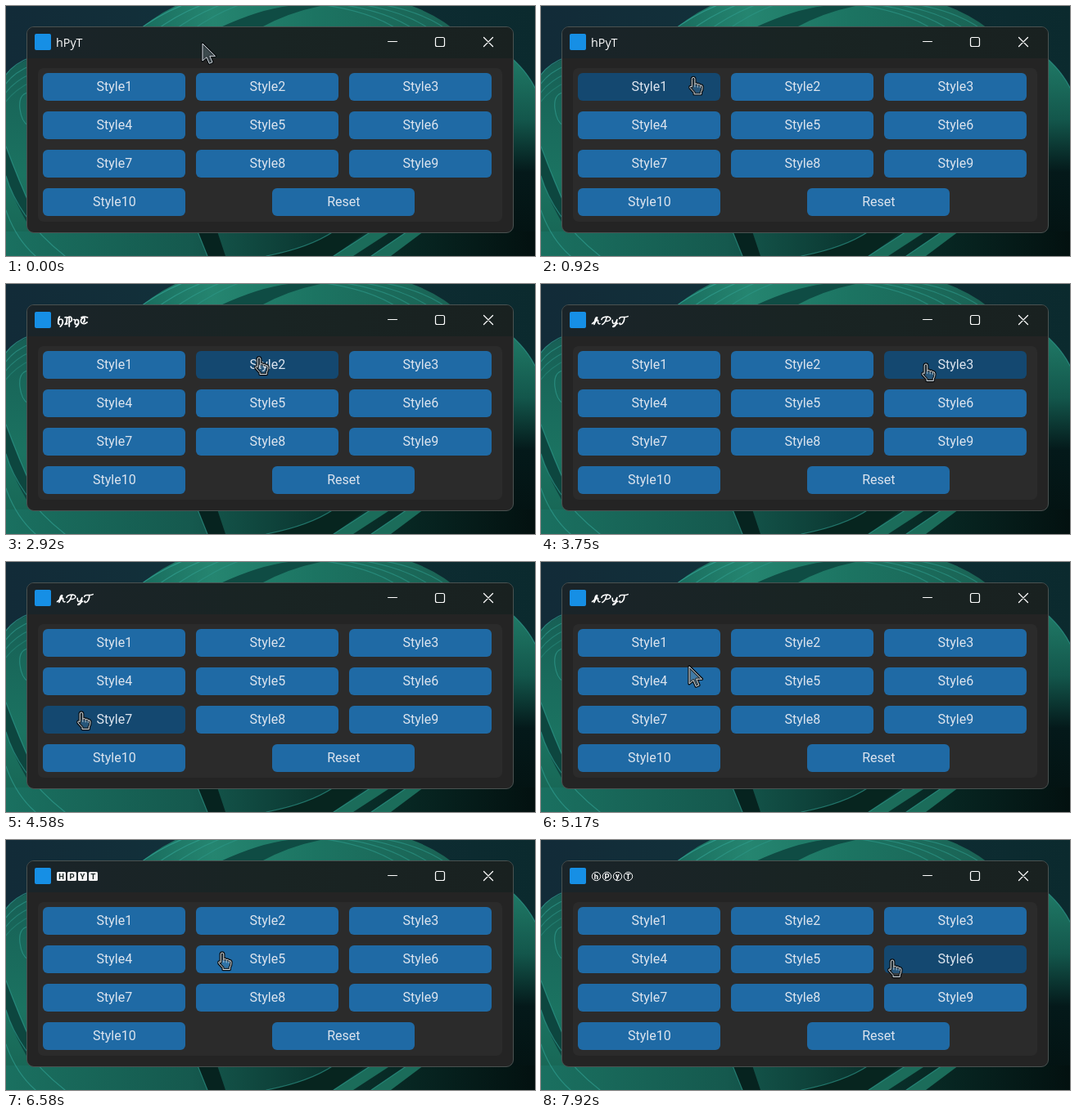
Animation of 646x306 px, one loop 8000 ms. Source, as an HTML page:

```html
<!DOCTYPE html>
<html lang="en">
<head>
<meta charset="utf-8">
<title>hPyT</title>
<style>
  html, body { margin: 0; width: 100%; height: 100%; overflow: hidden; background: #0b2527; }
  svg { display: block; width: 646px; height: 306px; }
  .label { font: 16px Roboto, sans-serif; fill: #dce4ee; text-anchor: middle; }
  .plain { font: 14.3px "Open Sans", sans-serif; fill: #fff; }
  .tile { font: 700 9.5px Roboto, sans-serif; text-anchor: middle; }
  .line { fill: none; stroke-linecap: round; stroke-linejoin: round; }
</style>
</head>
<body>
<svg viewBox="0 0 646 306">
  <defs>
    <linearGradient id="sky"><stop stop-color="#122b38"/><stop offset=".3" stop-color="#12303a"/><stop offset="1" stop-color="#0b2a2e"/></linearGradient>
    <linearGradient id="crown"><stop stop-color="#17695b"/><stop offset=".25" stop-color="#258570"/><stop offset=".55" stop-color="#1c7462"/><stop offset="1" stop-color="#1a6153"/></linearGradient>
    <linearGradient id="side" x2="0" y2="1"><stop stop-color="#175f55"/><stop offset=".6" stop-color="#1b7361"/><stop offset="1" stop-color="#176352"/></linearGradient>
    <linearGradient id="edge" x2="0" y2="1"><stop stop-color="#22806b"/><stop offset=".35" stop-color="#13564b"/><stop offset=".6" stop-color="#04191a"/><stop offset="1" stop-color="#031110"/></linearGradient>
    <linearGradient id="base"><stop stop-color="#1a7060"/><stop offset=".35" stop-color="#15594e"/><stop offset=".6" stop-color="#0a352f"/><stop offset="1" stop-color="#031110"/></linearGradient>
    <linearGradient id="bar"><stop stop-color="#1a2429"/><stop offset=".5" stop-color="#192423"/><stop offset="1" stop-color="#192120"/></linearGradient>
    <clipPath id="pane"><rect x="26" y="26" width="593" height="251" rx="8"/></clipPath>
  </defs>

  <g id="wallpaper">
    <rect width="646" height="306" fill="url(#sky)"/>
    <path d="M150 40Q192 0 240-12H450Q520 0 560 40Z" fill="url(#crown)"/>
    <path d="M262 26Q310 4 345 0H384Q345 8 312 26Z" fill="#0f4c44"/>
    <path d="M600 50Q632 72 646 100V306H600Z" fill="url(#edge)"/>
    <path d="M0 84Q10 70 40 60V306H0Z" fill="url(#side)"/>
    <path d="M0 276H646V306H0Z" fill="url(#base)"/>
    <path d="M0 172Q16 215 32 250V276Q10 240 0 208Z" fill="#0d463f"/>
    <path d="M234 276H258L268 306H246Z" fill="#06231f"/>
    <path d="M318 306Q370 296 400 276H440L400 306Z" fill="#07251f"/>
    <path d="M400 306L446 276H470L424 306ZM446 306L490 276H510L470 306Z" fill="#1b6c5a"/>
  </g>

  <rect x="25.5" y="25.5" width="594" height="252" rx="8.5" fill="#242424" stroke="#4a5251"/>
  <rect x="26" y="26" width="593" height="38" fill="url(#bar)" clip-path="url(#pane)"/>
  <rect x="39" y="76" width="567" height="188" rx="7" fill="#2b2b2b"/>
  <rect x="35" y="34" width="20" height="20" rx="2" fill="#168fe5"/>
  <path class="line" stroke="#fff" stroke-width="1.2" d="M466.5 43.5H477.5M526.5 38.5H533.5Q535.5 38.5 535.5 40.5V47.5Q535.5 49.5 533.5 49.5H526.5Q524.5 49.5 524.5 47.5V40.5Q524.5 38.5 526.5 38.5M583.5 38.5L594.5 49.5M594.5 38.5L583.5 49.5"/>
  <g id="titles" transform="translate(62 50)"></g>
  <g id="buttons"></g>
  <g id="cursor"></g>
</svg>

<script>
const NS = "http://www.w3.org/2000/svg";
const byId = id => document.getElementById(id);

function add(parent, tag, attrs = {}, text = "") {
  const node = document.createElementNS(NS, tag);
  for (const key in attrs) node.setAttribute(key, attrs[key]);
  node.textContent = text;
  parent.append(node);
  return node;
}
const show = (node, on) => node.setAttribute("visibility", on ? "visible" : "hidden");

// Fine rim lights along the folds of the wallpaper.
const wallpaper = byId("wallpaper");
const rim = (d, opacity = 0.6) =>
  add(wallpaper, "path", { class: "line", d, stroke: "#33a396", "stroke-width": 1.2, opacity });
for (let i = 0; i < 4; i++) {
  rim(`M${158 + i * 22} 32Q${200 + i * 22} 0 ${250 + i * 24} -12`, 0.75 - i * 0.12);
  rim(`M${365 + i * 26} -4Q${450 + i * 20} 4 ${488 + i * 20} 36`, 0.5);
  rim(`M0 ${84 + i * 11}Q10 ${70 + i * 11} 32 ${62 + i * 10}`, 0.7 - i * 0.12);
}
rim("M27 106Q15 108 17 126Q19 142 27 146");
rim("M0 172Q16 215 32 250");
rim("M0 208Q16 262 72 306");
rim("M0 250Q12 285 36 306");
rim("M600 50Q632 72 646 100");
rim("M234 276L246 306");
rim("M318 306Q370 296 400 276");
rim("M400 306L446 276M446 306L490 276");

// Window titles, one per style, starting with the unstyled one.
const FRAKTUR = "M3-11Q1-8 1.5-1L3 0M2-6Q5-9 7-6Q8-1 4 3" +
  "M10-10Q13-12 12.5-6Q12-1 10 0L13-1M12.5-9Q17-13 18.5-9Q20-4 15-3M15.5-10V3" +
  "M21.5-7L23.5-6Q22-1 24 0Q26 0 27-1M25-7L27-6Q29 0 24 3.5" +
  "M31-10Q34-12 39-10M34-10Q29-7 31-3Q34 1 38.5-3M35-9Q36-5 34-3.5";
const SCRIPT = "M0-1Q6-6 6.5-10Q4-12 2.5 0Q5-7 7.5-6Q7 0 10-1" +
  "M12-7Q13-11 20-11Q25-10 23-6.5Q21-4 17.5-5M18.5-10Q17-2 13 0" +
  "M26-6Q26 0 29-1.5Q31-3 32-7Q31 3 27 3.5Q25 3 33-1.5" +
  "M35-8Q35-11 39-10.5Q43-10 46-11.5M41.5-10Q41-1 36.5 0Q35 0 35.5-2";

const titles = Array.from({ length: 7 }, () => add(byId("titles"), "g", { "aria-label": "hPyT" }));
const penned = (group, d, width) =>
  add(group, "path", { class: "line", d, stroke: "#fff", "stroke-width": width, transform: "translate(.5 -.5) scale(.95 .86)" });
add(titles[0], "text", { class: "plain", x: -1 }, "hPyT");
penned(titles[1], FRAKTUR, 1.3);
penned(titles[2], FRAKTUR, 1.9);
penned(titles[3], SCRIPT, 1.7);
penned(titles[4], SCRIPT, 1.1);
[..."HPYT"].forEach((letter, i) => {
  const x = 5.5 + i * 13;
  add(titles[5], "rect", { x: x - 5.5, y: -11, width: 11, height: 11, rx: 1.5, fill: "#f4f4f4" });
  add(titles[5], "text", { class: "tile", x, y: -2, fill: "#192423" }, letter);
});
[..."hPyT"].forEach((letter, i) => {
  const x = 5.5 + i * 13;
  add(titles[6], "circle", { cx: x, cy: -5.5, r: 5.2, fill: "none", stroke: "#fff" });
  add(titles[6], "text", { class: "tile", x, y: letter === "y" ? -3.5 : -2.4, fill: "#fff" }, letter);
});

const buttons = Array.from({ length: 11 }, (_, i) => {
  const reset = i === 10;
  const x = reset ? 325 : 45 + (i % 3) * 187;
  const y = 82 + Math.floor(i / 3) * 47;
  const face = add(byId("buttons"), "rect", { x, y, width: 174, height: 34, rx: 6 });
  add(byId("buttons"), "text", { class: "label", x: x + 87.4, y: y + 22 }, reset ? "Reset" : `Style${i + 1}`);
  return { x, y, face };
});

// Pointer shapes have their hot spot at 0,0.
function pointer(d, fillOpacity) {
  const group = add(byId("cursor"), "g");
  add(group, "path", { class: "line", d, stroke: "#0b0f12", "stroke-width": 3.4 });
  add(group, "path", { d, fill: "#8fa3ad", "fill-opacity": fillOpacity, stroke: "#d5dde2", "stroke-width": 1, "stroke-linejoin": "round" });
  return group;
}
const arrow = pointer("M0 0V21L5 16.7L8.3 24.3L12 22.7L8.8 15.3H15.5Z", 0.3);
const hand = pointer("M-1.8 2Q-1.8 0 0 0Q1.8 0 1.8 2V8Q4 6.8 5.2 8.5Q7 7.8 8.3 9.5Q11 9 11 12Q11 16 9.3 18V20.5H1V18.5L-4 13Q-5 10-1.8 11.5Z", 0.15);
add(hand, "path", { class: "line", d: "M1.8 8V11.5M5.2 9V12M8.3 10V12.5", stroke: "#d5dde2", "stroke-width": 0.8 });

const PATH = [
  [250, 240, 46], [1080, 180, 92], [1580, 187, 87], [1750, 187, 87], [2420, 315, 96],
  [2920, 309, 90], [3420, 470, 98], [3750, 470, 98], [4580, 92, 184], [4830, 105, 180],
  [5170, 181, 128], [5500, 165, 140], [5750, 165, 140], [6400, 264, 138], [6750, 264, 138],
  [7500, 429, 147]
];
const CLICKS = [1250, 2580, 3580, 5580, 6560, 7670];

function position(t) {
  const next = PATH.findIndex(key => key[0] > t);
  if (next === 0) return PATH[0].slice(1);
  if (next < 0) return PATH.at(-1).slice(1);
  const [t0, x0, y0] = PATH[next - 1], [t1, x1, y1] = PATH[next];
  const u = (t - t0) / (t1 - t0), e = u * u * (3 - 2 * u);
  return [x0 + (x1 - x0) * e, y0 + (y1 - y0) * e];
}

function draw(t) {
  const [x, y] = position(t);
  const style = CLICKS.filter(click => click <= t).length;
  const pressed = style > 0 && t - CLICKS[style - 1] < 100;
  const hovered = buttons.find(b => x >= b.x && x < b.x + 174 && y >= b.y && y < b.y + 34);
  buttons.forEach(b => b.face.setAttribute("fill", b === hovered && !pressed ? "#144870" : "#1f6aa5"));
  titles.forEach((title, i) => show(title, i === style));
  show(arrow, !hovered);
  show(hand, hovered);
  byId("cursor").setAttribute("transform", `translate(${x.toFixed(1)} ${y.toFixed(1)})`);
}

const STEP = 1000 / 12, start = performance.now();
function tick() {
  const t = (performance.now() - start) % 8000;
  draw(Math.floor((t + 5) / STEP) % 96 * STEP);
  requestAnimationFrame(tick);
}
tick();
</script>
</body>
</html>
```
